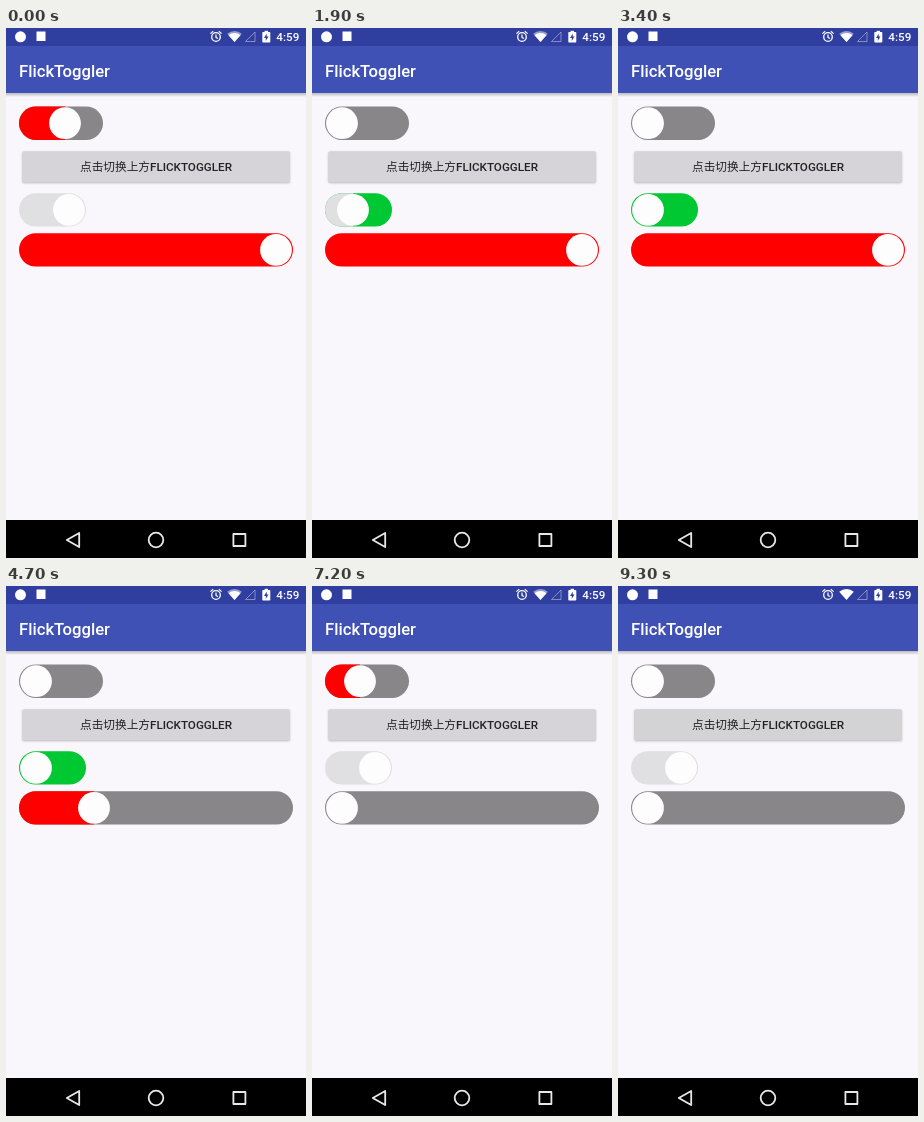
Animation of 300x530 px, one loop 9.9 s. Source, as an HTML page with a canvas:

```html
<!DOCTYPE html>
<html lang="zh">
<head>
<meta charset="utf-8">
<title>FlickToggler</title>
<style>
  html, body { margin: 0; width: 100%; height: 100%; overflow: hidden; background: #f9f7fb; }
  canvas { display: block; width: 300px; height: 530px; }
</style>
</head>
<body>
<canvas id="stage" width="300" height="530"></canvas>
<script>
const ctx = document.getElementById('stage').getContext('2d');
const LOOP = 9900, TICK = 100;
const LATIN = 'Roboto, sans-serif';
const CJK = '"Noto Sans CJK SC", "Noto Sans CJK", sans-serif';

// Thumb centres over time: [ms, x], linear in between.
const switches = [
  { left: 13, right: 97, top: 78.5, on: '#ff0000', off: '#888688',
    path: [[0, 59], [210, 80], [900, 80], [1400, 30], [7100, 30], [7200, 48],
           [8200, 80], [8800, 80], [9300, 30]] },
  { left: 13, right: 80, top: 165.2, on: '#e0dfe1', off: '#00c832',
    path: [[1700, 63], [2000, 30], [5900, 30], [6100, 63]] },
  { left: 13, right: 287, top: 205.2, on: '#ff0000', off: '#888688',
    path: [[2500, 270], [2600, 104.5], [2700, 50], [2800, 30], [3100, 30],
           [3200, 120], [3300, 215], [3400, 270], [4600, 270], [4700, 88], [4800, 30]] }
];

function valueAt(path, t) {
  const next = path.findIndex(([time]) => time > t);
  if (next < 0) return path[path.length - 1][1];
  if (next === 0) return path[0][1];
  const [t0, x0] = path[next - 1], [t1, x1] = path[next];
  return x0 + (x1 - x0) * (t - t0) / (t1 - t0);
}

function rect(x, y, w, h, color) {
  ctx.fillStyle = color;
  ctx.fillRect(x, y, w, h);
}

function rounded(x, y, w, h, r, color) {
  ctx.fillStyle = color;
  ctx.beginPath();
  ctx.roundRect(x, y, w, h, r);
  ctx.fill();
}

function disc(x, y, r, color) {
  ctx.fillStyle = color;
  ctx.beginPath();
  ctx.arc(x, y, r, 0, Math.PI * 2);
  ctx.fill();
}

function ring(x, y, r, width, color) {
  ctx.strokeStyle = color;
  ctx.lineWidth = width;
  ctx.beginPath();
  ctx.arc(x, y, r, 0, Math.PI * 2);
  ctx.stroke();
}

function poly(points, closed = true) {
  ctx.beginPath();
  points.forEach(([x, y]) => ctx.lineTo(x, y));
  if (closed) ctx.closePath();
}

function text(str, x, y, font, color) {
  ctx.font = font;
  ctx.fillStyle = color;
  ctx.fillText(str, x, y);
}

function fan(x, bottom, r, color) {
  ctx.fillStyle = color;
  ctx.beginPath();
  ctx.moveTo(x, bottom);
  ctx.arc(x, bottom, r, -Math.PI * 0.73, -Math.PI * 0.27);
  ctx.fill();
}

function drawAlarm() {
  ring(210, 9, 4.3, 1.3, '#fff');
  ctx.lineWidth = 1.2;
  poly([[210, 6.5], [210, 9.4], [212, 10.6]], false);
  ctx.stroke();
  poly([[204.4, 5.6], [207.2, 3.3]], false);
  ctx.stroke();
  poly([[212.8, 3.3], [215.6, 5.6]], false);
  ctx.stroke();
}

function drawStatusBar(strongWifi) {
  rect(0, 0, 300, 18, '#303f9f');
  disc(14.5, 8.8, 5.5, '#fff');
  rect(30.5, 3.5, 9, 9.5, '#fff');
  drawAlarm();
  fan(228.5, 14, 11, strongWifi ? '#fff' : 'rgba(255,255,255,.5)');
  if (!strongWifi) fan(228.5, 14, 9, '#fff');

  ctx.strokeStyle = 'rgba(255,255,255,.4)';
  ctx.lineWidth = 1;
  poly([[239.5, 13.5], [249, 13.5], [249, 4]]);
  ctx.stroke();

  rounded(256.3, 4, 8, 10.5, 0.8, '#fff');
  rect(258.6, 2.8, 3.4, 1.5, '#fff');
  ctx.fillStyle = '#303f9f';
  poly([[260.8, 5.5], [258, 10], [259.9, 10], [259.7, 13], [262.5, 8.5], [260.7, 8.5]]);
  ctx.fill();

  ctx.textAlign = 'right';
  text('4:59', 293.3, 13, `500 11.67px ${LATIN}`, '#fff');
  ctx.textAlign = 'left';
}

function drawAppBar() {
  const shade = ctx.createLinearGradient(0, 65, 0, 69);
  shade.addColorStop(0, 'rgba(0,0,0,.25)');
  shade.addColorStop(1, 'rgba(0,0,0,0)');
  rect(0, 65, 300, 4, shade);
  rect(0, 18, 300, 47, '#3f51b5');
  text('FlickToggler', 13, 48.5, `500 16.67px ${LATIN}`, '#fff');
}

function drawButton(pressed) {
  ctx.save();
  ctx.shadowColor = 'rgba(0,0,0,.25)';
  ctx.shadowBlur = 2;
  ctx.shadowOffsetY = 0.8;
  rounded(16.3, 123.3, 267.7, 31.2, 1.7, pressed ? '#d3d2d4' : '#d6d4d9');
  ctx.restore();

  const prompt = '点击切换上方', name = 'FLICKTOGGLER';
  const promptFont = `400 11.67px ${CJK}`, nameFont = `500 11.67px ${LATIN}`;
  ctx.font = promptFont;
  const promptWidth = ctx.measureText(prompt).width;
  ctx.font = nameFont;
  const x = 150 - (promptWidth + ctx.measureText(name).width) / 2;
  text(prompt, x, 143, promptFont, '#222');
  text(name, x + promptWidth, 143, nameFont, '#222');
}

function drawSwitch({ left, right, top, on, off, path }, t) {
  const x = valueAt(path, t), height = 33.4, width = right - left;
  const atLeft = x <= left + 17, atRight = x >= right - 17;
  rounded(left, top, width, height, height / 2, atRight ? on : off);
  if (!atLeft && !atRight) {
    ctx.save();
    ctx.beginPath();
    ctx.rect(left - 1, top - 1, x - left + 1, height + 2);
    ctx.clip();
    rounded(left, top, width, height, height / 2, on);
    ctx.restore();
  }
  disc(x, top + height / 2, 15.9, '#fefdfe');
}

function drawNavBar() {
  rect(0, 492, 300, 38, '#000');
  ring(150, 512, 7.3, 1.8, '#e8e8e8');
  ctx.lineJoin = 'round';
  poly([[60.8, 512], [73.2, 505], [73.2, 519]]);
  ctx.stroke();
  ctx.strokeRect(227.4, 506, 12, 12);
}

function draw(t) {
  const pressed = (t >= 900 && t < 1400) || t >= 8900;
  rect(0, 0, 300, 530, '#f9f7fb');
  drawStatusBar(t >= 7700);
  drawAppBar();
  drawButton(pressed);
  switches.forEach(item => drawSwitch(item, t));
  drawNavBar();
}

const start = performance.now();
function frame() {
  const t = (performance.now() - start) % LOOP;
  draw(Math.floor(t / TICK) * TICK);
  requestAnimationFrame(frame);
}
frame();
</script>
</body>
</html>
```
